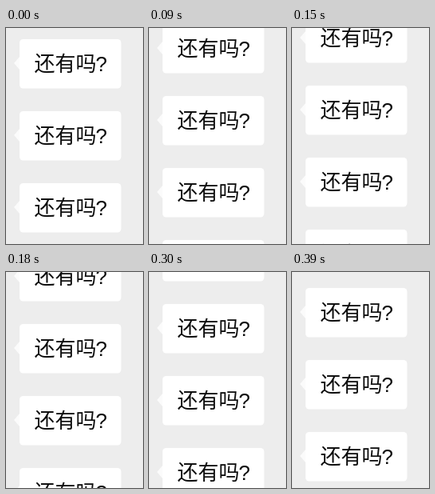
These frames come from a looping animation (172x270 px, 0.42 s). An HTML page with a canvas:

```html
<!DOCTYPE html>
<html lang="zh-CN">
<head>
<meta charset="utf-8">
<style>
  html, body { margin: 0; width: 100%; height: 100%; overflow: hidden; background: #ededed; }
  canvas { display: block; }
</style>
</head>
<body>
<canvas id="stage" width="172" height="270"></canvas>
<script>
const WIDTH = 172, HEIGHT = 270;
const LOOP = 420, STEPS = 14;
const SPACING = 90, FIRST_TOP = 14;
const BUBBLE = { x: 17, width: 127.5, height: 61.5, radius: 4.5 };
const HAN_FONT = '26px "Noto Sans CJK SC", "Noto Sans CJK", sans-serif';
const MARK_FONT = '26px "Liberation Sans", Arial, sans-serif';

const canvas = document.getElementById('stage');
const ctx = canvas.getContext('2d');
const ratio = window.devicePixelRatio || 1;
canvas.width = WIDTH * ratio;
canvas.height = HEIGHT * ratio;
canvas.style.width = WIDTH + 'px';
canvas.style.height = HEIGHT + 'px';
ctx.scale(ratio, ratio);

function drawText(text, font, x, baseline) {
  ctx.font = font;
  ctx.fillText(text, x, baseline);
}

function drawBubble(top) {
  const middle = top + 30;
  ctx.fillStyle = '#fff';
  ctx.beginPath();
  ctx.roundRect(BUBBLE.x, top, BUBBLE.width, BUBBLE.height, BUBBLE.radius);
  ctx.fill();

  ctx.fillStyle = '#fbfbfb';
  ctx.beginPath();
  ctx.moveTo(BUBBLE.x, middle - 8);
  ctx.lineTo(BUBBLE.x - 7, middle);
  ctx.lineTo(BUBBLE.x, middle + 8);
  ctx.fill();

  ctx.fillStyle = '#0c0c0c';
  drawText('还有吗', HAN_FONT, 35.5, top + 40);
  drawText('?', MARK_FONT, 112.5, top + 40);
}

function draw(time) {
  const step = Math.floor((time % LOOP) / LOOP * STEPS);
  const scroll = Math.round(step * SPACING / STEPS);
  ctx.fillStyle = '#ededed';
  ctx.fillRect(0, 0, WIDTH, HEIGHT);
  for (let top = FIRST_TOP - scroll; top < HEIGHT; top += SPACING) drawBubble(top);
}

function tick() {
  draw(performance.now());
  requestAnimationFrame(tick);
}
tick();
</script>
</body>
</html>
```
